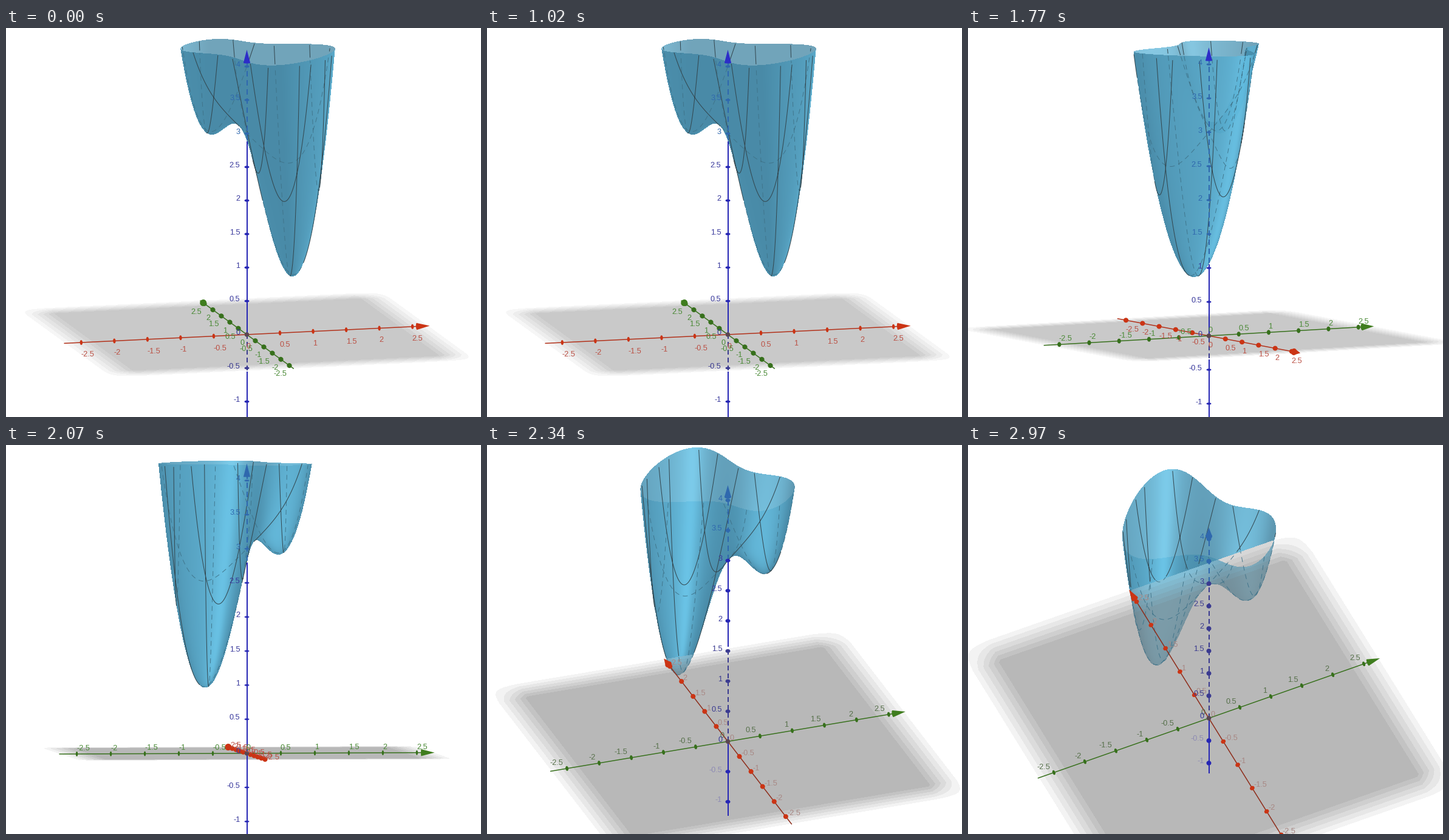
Recreate the animation shown at these times as a matplotlib script. Size 782x642 px, loop 3000 ms.

```python
import numpy as np
import matplotlib.pyplot as plt
from matplotlib.animation import FuncAnimation
from matplotlib.collections import PolyCollection

W, H = 782, 642
FRAMES, STEP = 100, 30
S = 112.6                       # pixels per unit
CX, CY, CZ = 396.5, 339.6, 1.504
HALF, ZMIN, ZMAX = 2.76, -1.235, 4.25

# camera path: time in ms, azimuth and elevation in degrees
KEY_T = np.array([0, 1500, 1620, 1770, 2070, 2160, 2340, 2640, 2970.])
KEY_A = np.array([14.4, 14.4, -6, -61, -96.1, -101.5, -109.8, -115, -115])
KEY_E = np.array([10.8, 10.8, 9.5, 6, -2.05, -14.2, -27.9, -44.1, -48.9])

RED, GREEN, BLUE = '#b23019', '#37701c', '#2626b4'
DEEP_RED = '#8e2c1a'
HEADS = ['#cb3414', '#3f7d1e', '#2d2dc8']
IN_SURF, IN_PLANE = '#2f68ae', '#3a3a90'


def smooth(t, ks, vs):
    """Monotone cubic interpolation."""
    d = np.diff(vs) / np.diff(ks)
    m = np.zeros(len(vs))
    for j in range(1, len(d)):
        if d[j - 1] * d[j] > 0:
            m[j] = 2 * d[j - 1] * d[j] / (d[j - 1] + d[j])
    j = min(np.searchsorted(ks, t, side='right') - 1, len(d) - 1)
    h = ks[j + 1] - ks[j]
    u = (t - ks[j]) / h
    return (vs[j] * (1 + 2 * u) * (1 - u) ** 2 + vs[j + 1] * u * u * (3 - 2 * u)
            + h * u * (1 - u) * (m[j] * (1 - u) - m[j + 1] * u))


def f(x, y):
    return (x - y) ** 4 + 8 * x * y - x + y + 3


class View:
    def __init__(self, t):
        a = np.radians(smooth(t, KEY_T, KEY_A))
        e = np.radians(smooth(t, KEY_T, KEY_E))
        self.deg = np.degrees(a), np.degrees(e)
        self.ca, self.sa, self.ce, self.se = np.cos(a), np.sin(a), np.cos(e), np.sin(e)
        if abs(self.se) < .004:
            self.se = .004
        self.below = self.se < 0
        self.right = np.array([self.ca, -self.sa, 0])
        self.up = np.array([self.sa * self.se, self.ca * self.se, self.ce])
        self.eye = np.array([-self.sa * self.ce, -self.ca * self.ce, self.se])
        self.oy = CY + CZ * S * self.ce

    def project(self, p):
        p = np.asarray(p, float)
        return np.stack([CX + S * (p @ self.right), self.oy - S * (p @ self.up)], -1)

    def on_plane(self, px, py):
        sx = (px - CX) / S
        q = (self.oy - py) / S / self.se
        return sx * self.ca + q * self.sa, q * self.ca - sx * self.sa

    def behind_plane(self, p):
        s = self.project(p)
        x, y = self.on_plane(s[:, 0], s[:, 1])
        return (p[:, 2] * self.se < 0) & (np.maximum(abs(x), abs(y)) < HALF)

    def behind_surface(self, p):
        q = p[:, None] + np.linspace(.04, 3.2, 60)[:, None] * self.eye
        inside = f(q[..., 0], q[..., 1]) < q[..., 2]
        return ((inside[:, 1:] != inside[:, :-1]) & (q[:, 1:, 2] < ZMAX)).any(1)


# ---- shaded picture: plane and surface
PX, PY = np.meshgrid(np.arange(W) + .5, np.arange(H) + .5)
X0, X1, Y1 = 245, 550, 415
LIGHT = np.array([.97, .12, -.2])
DARK, BRIGHT = np.array([66, 134, 164.]), np.array([100, 192, 228.])
NEAR, FAR = .85, .75            # opacity of the outer and inner side
HAZE = 225                      # gray left where the plane hides the near wall


def add_plane(img, v, fade):
    a = .5 * fade[..., None]
    img *= 1 - a
    img += a * (113 if v.below else 147)


def shade(x, y, sign):
    w3 = 4 * (x - y) ** 3
    n = np.stack([w3 + 8 * y - 1, 8 * x + 1 - w3, -np.ones_like(x)], -1)
    n *= (sign / np.sqrt((n * n).sum(-1)))[:, None]
    d = np.clip(n @ LIGHT, 0, 1)
    k = .75 * d ** 1.5 + .3 * d ** 10
    return DARK + (BRIGHT - DARK) * k[:, None]


def add_surface(img, v, fade):
    part = img[:Y1, X0:X1].reshape(-1, 3)
    cover = fade[:Y1, X0:X1].ravel() > .02
    sx = (PX[:Y1, X0:X1].ravel() - CX) / S
    sy = (v.oy - PY[:Y1, X0:X1].ravel()) / S
    base = [(sx * v.right[i] + sy * v.up[i] + 2.6 * v.se * v.eye[i]).astype(np.float32)
            for i in range(3)]
    bx, by, bz = base
    vx, vy, vz = (float(c) for c in v.eye)
    w, d = bx - by, vx - vy
    # height above the surface along each ray is a quartic
    c4, c3 = d ** 4, 4 * w * d ** 3
    c2 = 6 * w * w * d * d + 8 * vx * vy
    c1 = 4 * w ** 3 * d + 8 * (bx * vy + by * vx) - d - vz
    c0 = w ** 4 + 8 * bx * by - w + 3 - bz
    reach = 1.75 * abs(v.se) + 1.4 * v.ce
    ts = np.linspace(-reach, reach, 76)
    dt = ts[1] - ts[0]
    prev = None
    for t in ts.tolist():
        cur = (((c4 * t + c3) * t + c2) * t + c1) * t + c0
        if prev is not None:
            i = np.flatnonzero((prev < 0) != (cur < 0))
            tc = t - dt * cur[i] / (cur[i] - prev[i])
            near = prev[i] < 0
            keep = bz[i] + tc * vz < ZMAX
            if v.below:
                veiled = near & cover[i]
                j = i[keep & veiled]
                part[j] = np.minimum(part[j], HAZE)
                keep &= ~veiled
            i, tc, near = i[keep], tc[keep], near[keep]
            if len(i):
                col = shade(bx[i] + tc * vx, by[i] + tc * vy, np.where(near, 1, -1))
                part[i] += np.where(near, NEAR, FAR)[:, None] * (col - part[i])
        prev = cur
    img[:Y1, X0:X1] = part.reshape(Y1, X1 - X0, 3)


def picture(v):
    x, y = v.on_plane(PX, PY)
    ramp = lambda c: np.clip((HALF + .02 - abs(c)) / .5, 0, 1)
    fade = np.round(6 * ramp(x) * ramp(y)) / 6
    img = np.full((H, W, 3), 255.)
    for layer in (add_surface, add_plane) if v.below else (add_plane, add_surface):
        layer(img, v, fade)
    return np.clip(img, 0, 255).astype(np.uint8)


# ---- curves x = const and y = const on the surface
def mesh_lines():
    s = np.linspace(-1.4, 1.4, 420)
    out = []
    for k in (-1, -.5, 0, .5, 1):
        for x, y in ((k + 0 * s, s), (s, k + 0 * s)):
            p = np.stack([x, y, f(x, y)], -1)
            p[p[:, 2] > ZMAX] = np.nan
            out += [p, np.full((1, 3), np.nan)]
    return np.concatenate(out)


MESH = mesh_lines()
ZLINE = np.zeros((260, 3))
ZLINE[:, 2] = np.linspace(ZMIN, ZMAX - .15, 260)
AXES = np.eye(3)
VALUES = [np.arange(-5, 6) / 2, np.arange(-5, 6) / 2, np.arange(-2, 9) / 2]
ENDS = [HALF, HALF, ZMAX]
ROUND = np.linspace(0, 2 * np.pi, 24, endpoint=False)

fig = plt.figure(figsize=(W / 100, H / 100), dpi=100, facecolor='white')
ax = fig.add_axes([0, 0, 1, 1])
ax.axis('off')
screen = ax.imshow(np.full((H, W, 3), 255, np.uint8), extent=(0, W, H, 0),
                   interpolation='nearest', aspect='auto')
ax.set_xlim(0, W)
ax.set_ylim(H, 0)


def stroke(color, px, dash=None, z=2):
    style = (0, dash) if dash else '-'
    return ax.plot([], [], color=color, lw=px * .72, ls=style, zorder=z,
                   dash_capstyle='butt', solid_capstyle='butt')[0]


mesh_back = stroke('#3f7389', .9, (9, 7))
mesh_front = stroke('#33464e', 1)
z_surf = stroke(IN_SURF, 2, (4.5, 3), 3)
z_plane = stroke(IN_PLANE, 2, (4, 2.5), 3)
z_front = stroke(BLUE, 2, z=3)
x_line, y_line = stroke(RED, 1.5, z=4), stroke(GREEN, 1.5, z=4)
marks = PolyCollection([], linewidths=0, zorder=5)
ax.add_collection(marks)
labels = [[ax.text(0, 0, '%g' % n, family='Liberation Sans', size=9.1, va='baseline',
                   zorder=6, clip_on=True) for n in vals] for vals in VALUES]


def masked(pts, keep):
    return np.where(keep[:, None], pts, np.nan).T


def disc(c, d, k, r, thick):
    """Disc of radius r seen around an axis with screen direction d."""
    n = np.array([-d[1], d[0]])
    flat = r * np.sqrt(max(0, 1 - k * k)) + thick * k
    return c + np.outer(np.cos(ROUND) * r, n) + np.outer(np.sin(ROUND) * flat, d)


def place_labels(v, spots, z_cols):
    a, e = v.deg
    steep = e < -10
    x_dy = np.interp(e, [-49, -28, -2, 6, 10.8], [-7, -6.5, -4, 14.5, 18.5])
    y_left = a < -20 and not steep
    y_dy = -10.5 if a < -20 else 12.5
    rules = [('left', -.5 + 3 * v.below, x_dy),
             ('left', -.5, y_dy) if y_left else ('right', -4 - 2 * steep, y_dy),
             ('right', np.interp(e, [-45, -5], [-8, -11]), -4)]
    cols = ['#a88884' if steep else '#bb5044', '#56704a' if steep else '#4a8a36']
    for i, (side, dx, dy) in enumerate(rules):
        for j, (txt, (px, py)) in enumerate(zip(labels[i], spots[i])):
            txt.set_position((px + dx, py + dy + 4.5))
            txt.set_ha(side)
            if i < 2:
                txt.set_color(cols[i])
            elif steep and VALUES[2][j] < 0:
                txt.set_color('#8f8cb4')
            else:
                txt.set_color(z_cols[j] if z_cols[j] != BLUE else '#38389c')


shown = [None]


def draw(frame):
    t = max(frame * STEP, 1500)
    if shown[0] == t:
        return
    shown[0] = t
    v = View(t)
    screen.set_data(picture(v))

    ok = ~np.isnan(MESH[:, 0])
    safe = np.where(ok[:, None], MESH, 0)
    hid = v.behind_surface(safe)
    if v.below:
        hid |= v.behind_plane(safe)
    pts = v.project(MESH)
    mesh_back.set_data(*masked(pts, ok & hid))
    mesh_front.set_data(*masked(pts, ok & ~hid))

    pts = v.project(ZLINE)
    surf, plane = v.behind_surface(ZLINE), v.behind_plane(ZLINE)
    z_surf.set_data(*masked(pts, surf))
    z_plane.set_data(*masked(pts, plane & ~surf))
    z_front.set_data(*masked(pts, ~surf & ~plane))
    for line, axis in ((x_line, AXES[0]), (y_line, AXES[1])):
        line.set_data(*v.project([-HALF * axis, (HALF - .1) * axis]).T)
    x_line.set_color(DEEP_RED if v.below else RED)

    polys, cols, spots = [], [], []
    for i, axis in enumerate(AXES):
        p = VALUES[i][:, None] * axis
        d = v.project(axis) - v.project(0 * axis)
        k = np.hypot(*d) / S
        d = d / np.hypot(*d)
        spot = v.project(p)
        spots.append(spot)
        tint = [HEADS[i] if i != 1 else GREEN] * len(p)
        head = HEADS[i]
        if i == 2:
            s, b = v.behind_surface(p), v.behind_plane(p)
            tint = [IN_SURF if m else IN_PLANE if n else BLUE for m, n in zip(s, b)]
            z_cols = tint
            if v.behind_surface(axis[None] * (ZMAX - .1))[0]:
                head = IN_SURF
        for c, n, col in zip(spot, VALUES[i], tint):
            if n:
                polys.append(disc(c, d, k, 4, 1.3))
                cols.append(col)
        tip = v.project(axis * ENDS[i])
        foot = v.project(axis * (ENDS[i] - .195))
        side = 5.6 * np.array([-d[1], d[0]])
        polys += [np.array([tip, foot + side, foot - side]), disc(foot, d, k, 5.6, 0)]
        cols += [head, head]
    polys.append(disc(v.project(np.zeros(3)), np.array([1, 0]), 0, 3.8, 0))
    cols.append('#5a4650')
    marks.set_verts(polys)
    marks.set_facecolor(cols)
    place_labels(v, spots, z_cols)


anim = FuncAnimation(fig, draw, frames=FRAMES, interval=STEP, repeat=True,
                     repeat_delay=0, blit=False)
plt.show()
```
